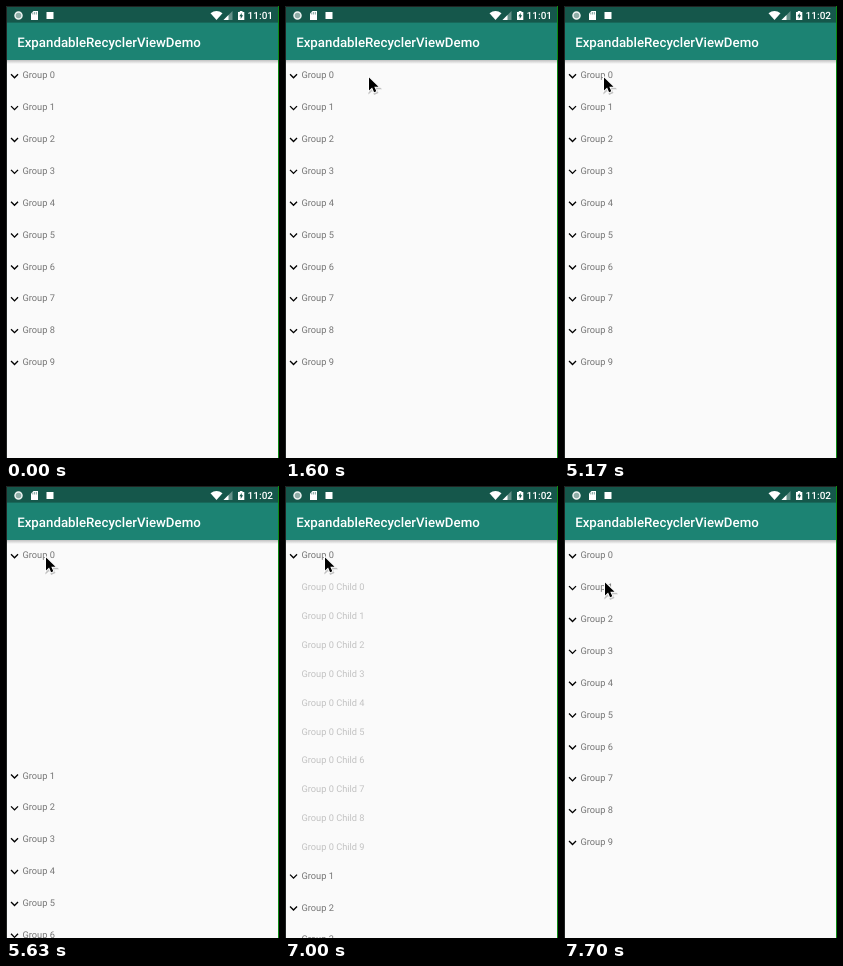
An HTML page for the animation above (8 s loop, 273 by 452 pixels).

```html
<!DOCTYPE html>
<html lang="en">
<head>
<meta charset="utf-8">
<title>Expandable list</title>
<style>
  html, body { margin: 0; width: 100%; height: 100%; overflow: hidden; background: #fafafa; }
  svg { display: block; width: 273px; height: 452px; }
  text { font-family: Roboto, sans-serif; text-rendering: geometricPrecision; white-space: pre; }
  .row { font-size: 9.25px; fill: #757575; }
  .bar { font-weight: 500; fill: #fff; }
</style>
</head>
<body>
<svg viewBox="0 0 273 452">
  <defs>
    <linearGradient id="shade" x2="0" y2="1">
      <stop stop-color="#000" stop-opacity=".23"/>
      <stop offset="1" stop-color="#000" stop-opacity="0"/>
    </linearGradient>
    <path id="chevron" d="M16.59 8.59 12 13.17 7.41 8.59 6 10l6 6 6-6z" transform="scale(.66)"/>
    <path id="arrow" d="M1 1.5v13l3.100-2.900 2 4.600 2.200-1-2-4.400h4.200z"/>
  </defs>
  <rect width="273" height="452" fill="#fafafa"/>
  <g id="list"></g>

  <rect y="54" width="273" height="4" fill="url(#shade)"/>
  <rect width="273" height="54" fill="#1c8373"/>
  <rect width="273" height="16.600" fill="#15574b"/>
  <text class="bar" x="11.200" y="40.800" font-size="13.280">ExpandableRecyclerViewDemo</text>

  <g fill="#fff">
    <circle cx="12.500" cy="9.500" r="3.500" fill="#8fada7" stroke="#eef3f2" stroke-width="1.500"/>
    <path d="M27.500 5h4.500v9h-7V7.500z"/>
    <path d="M26.800 6.500v2M28.600 6v2.500M30.400 6v2.500" stroke="#15574b" stroke-width=".5"/>
    <rect x="40.500" y="6" width="7" height="7"/>
    <path d="M204.500 7.200q6-4.400 12 0L210.500 14z"/>
    <path d="M226.500 5v9h-9z" opacity=".35"/>
    <path d="M222.500 9v5h-5z"/>
    <path d="M232 6h1.800V5h2.700v1h1.800v8H232z"/>
    <path d="M235.700 7v2.300h1.400L234.700 13v-2.700h-1.400z" fill="#15574b"/>
  </g>
  <text id="clock" class="bar" x="267" y="13.300" font-size="10" text-anchor="end"></text>

  <path d="M.5 452V.5H272" fill="none" stroke="#202322"/>
  <path d="M272.500 0V452" stroke="#0c8a12"/>
  <g id="cursor">
    <use href="#arrow" x=".6" y="1.200" stroke="#000" stroke-width="2.400" opacity=".22"/>
    <use href="#arrow" stroke="#fff" stroke-width="2"/>
    <use href="#arrow"/>
  </g>
</svg>
<script>
const LOOP = 8000, STEP = 100 / 3;
const GROUP_GAP = 31.87, CHILD_GAP = 28.85, COUNT = 10;
const $ = id => document.getElementById(id);

// Cursor stops: time, x, y
const stops = [
  [937, -6, 142], [1067, 16, 74], [1237, 16, 74], [1400, 82, 66], [1537, 82, 66],
  [1600, 83, 70], [3067, 83, 70], [3267, 39, 70], [7400, 39, 70], [7550, 36, 82], [7700, 40, 95]
];

const indexes = [...Array(COUNT).keys()];
const label = (text, y) => `<text class="row" x="16.5" y="${y + 3.3}">${text}</text>`;
const group = i => {
  const y = 69 + i * GROUP_GAP;
  return `<use href="#chevron" x=".6" y="${y - 6.9}"/>` + label(`Group ${i}`, y);
};
const child = i => label(`Group 0 Child ${i}`, 101 + i * CHILD_GAP);

$('list').innerHTML = group(0) +
  `<g id="children">${indexes.map(child).join('')}</g>` +
  `<g id="others">${indexes.slice(1).map(group).join('')}</g>`;

// Accelerate-decelerate from 0 to 1; stays at 0 until the first drawn step
function ramp(t, start, end, first = start) {
  if (t < first) return 0;
  const p = Math.min(1, (t - start) / (end - start));
  return (1 - Math.cos(Math.PI * p)) / 2;
}

function cursorAt(t) {
  const next = stops.findIndex(s => s[0] > t);
  if (next < 0) return stops[stops.length - 1].slice(1);
  if (next === 0) return [-50, 0];
  const [t0, x0, y0] = stops[next - 1], [t1, x1, y1] = stops[next];
  const p = (t - t0) / (t1 - t0);
  return [x0 + (x1 - x0) * p, y0 + (y1 - y0) * p];
}

function draw() {
  const t = Math.floor((performance.now() % LOOP + 3.4) / STEP) * STEP;
  const open = ramp(t, 5483.6, 5733.6, 5530) - ramp(t, 7040, 7266);
  const alpha = ramp(t, 5745, 5890) - ramp(t, 6941, 7048, 6990);

  $('others').setAttribute('transform', `translate(0 ${open * COUNT * CHILD_GAP})`);
  $('children').setAttribute('opacity', alpha);
  $('cursor').setAttribute('transform', `translate(${cursorAt(t)})`);
  $('clock').textContent = t < 5160 ? '11:01' : '11:02';
  requestAnimationFrame(draw);
}
draw();
</script>
</body>
</html>
```
